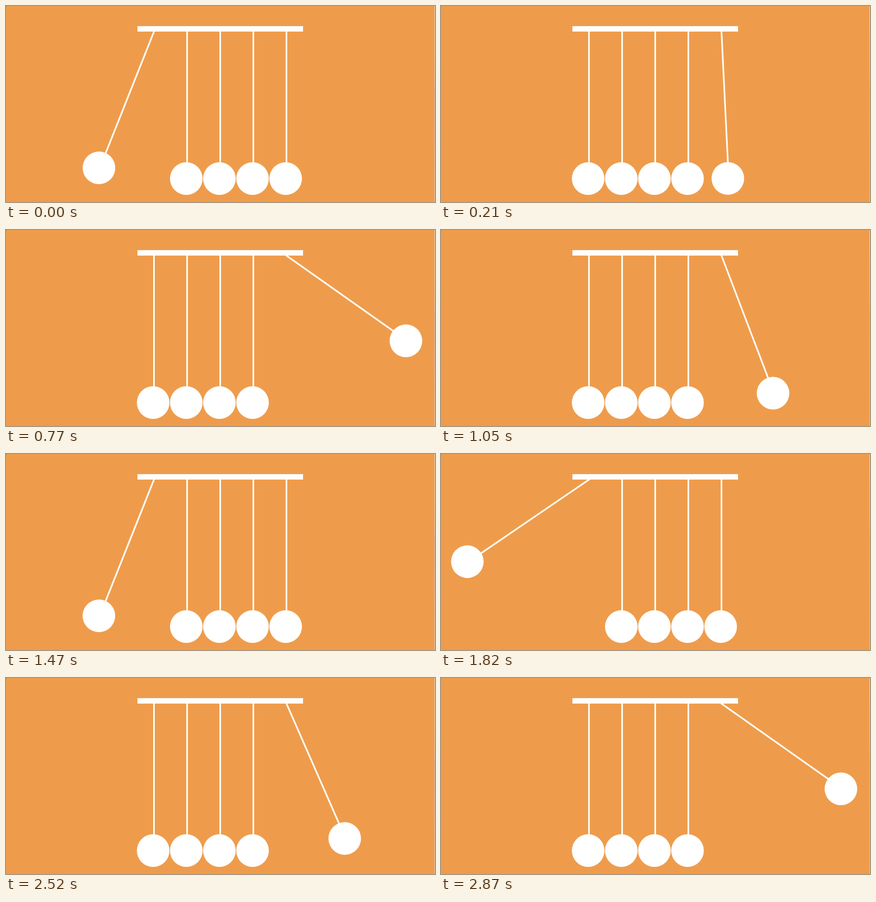
An HTML page for the animation above (2940 ms loop, 790 px wide and 360 px high).

```html
<!DOCTYPE html>
<html lang="en">
<head>
<meta charset="utf-8">
<title>Pendulum cradle</title>
<style>
  html, body { margin: 0; width: 100%; height: 100%; overflow: hidden; background: #ee9c4c; }
  svg { display: block; width: 790px; height: 360px; }
</style>
</head>
<body>
<svg viewBox="0 0 790 360">
  <defs>
    <linearGradient id="edge" x1="0" y1="0" x2="0" y2="1">
      <stop offset="0" stop-color="#ecd2b8"/>
      <stop offset=".38" stop-color="#e3cab6"/>
      <stop offset=".42" stop-color="#cfb6bb"/>
      <stop offset=".6" stop-color="#d6bdbb"/>
      <stop offset="1" stop-color="#e3c5ac"/>
    </linearGradient>
    <g id="pendulum" fill="#fff">
      <rect x="-1.5" y="-1" width="3" height="245" fill="#fffdf6"/>
      <circle cx="-1.5" cy="270" r="30"/>
    </g>
  </defs>
  <rect width="790" height="360" fill="#ee9c4c"/>
  <rect x="789" width="1" height="360" fill="url(#edge)"/>
  <rect width="1" height="1" fill="#6b4a2a"/>
  <g id="cradle"></g>
  <rect x="242" y="37" width="305" height="10" fill="#fff"/>
</svg>
<script>
const LOOP = 2940, STEP = 70, PERIOD = 2100, MAX_ANGLE = 60;
const PIVOT_X = 272.5, PIVOT_Y = 47, SPACING = 61;

// Swing start, apex and end, in ms within a period
const RIGHT = [120, 645, 1170];
const LEFT = [1185, 1710, 2222];

const cradle = document.getElementById('cradle');
const pendulums = Array.from({ length: 5 }, () => {
  const use = document.createElementNS('http://www.w3.org/2000/svg', 'use');
  use.setAttribute('href', '#pendulum');
  return cradle.appendChild(use);
});

// cubic-bezier(.42, 0, 1, 1)
function easeIn(x) {
  let low = 0, high = 1;
  for (let i = 0; i < 30; i++) {
    const s = (low + high) / 2, r = 1 - s;
    if (1.26 * r * r * s + 3 * r * s * s + s ** 3 < x) low = s;
    else high = s;
  }
  return 3 * low * low - 2 * low ** 3;
}

function swing(time, [start, apex, end]) {
  const t = start + (time - start + PERIOD) % PERIOD;
  if (t >= end) return 0;
  return MAX_ANGLE * (t < apex
    ? easeIn((t - start) / (apex - start))
    : 1 - easeIn((t - apex) / (end - apex)));
}

function pose(index, angle) {
  pendulums[index].setAttribute('transform',
    `translate(${PIVOT_X + index * SPACING} ${PIVOT_Y}) rotate(${angle})`);
}

function draw(now) {
  const time = Math.floor((now % LOOP) / STEP) * STEP % PERIOD;
  pose(0, swing(time, LEFT));
  pose(4, -swing(time, RIGHT));
}

pendulums.forEach((_, i) => pose(i, 0));
draw(0);
let origin;
requestAnimationFrame(function tick(now) {
  origin ??= now;
  draw(now - origin);
  requestAnimationFrame(tick);
});
</script>
</body>
</html>
```
